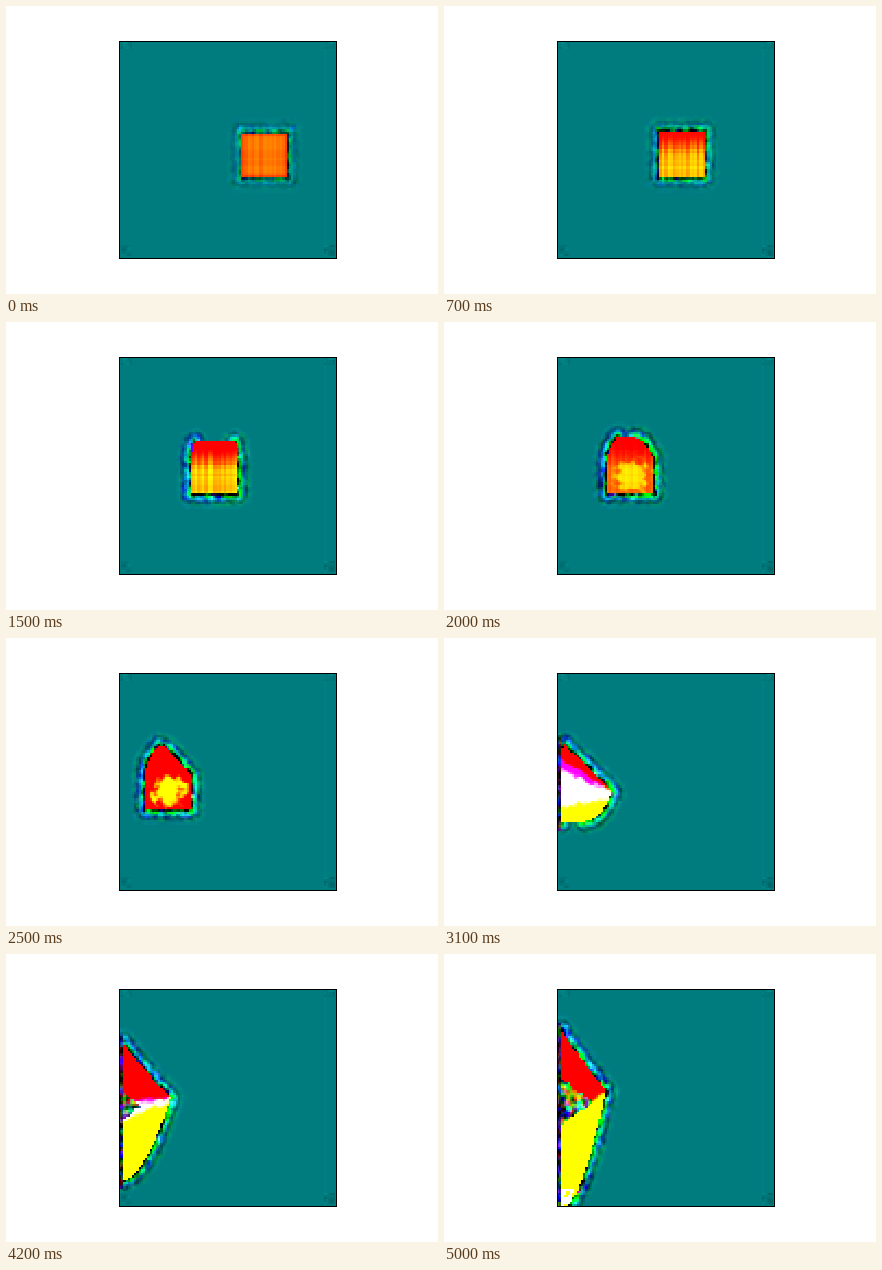
Animation of 432 by 288 pixels, one loop 5100 ms. Source, as a matplotlib script:

```python
import numpy as np
import matplotlib.pyplot as plt
from matplotlib.animation import FuncAnimation

FRAMES, STEP = 51, 100
N = 100
LEFT, TOP, SIZE = 112.7, 34.6, 217.4
CELL = SIZE / N
WALL = 117
HALF = 23
TEAL = (0.0, 0.49, 0.5)

axis = (np.arange(N) + 0.5) * CELL
X, Y = np.meshgrid(LEFT + axis, TOP + axis)
rng = np.random.default_rng(4)


def smooth(a, b, x):
    t = np.clip((x - a) / (b - a), 0, 1)
    return t * t * (3 - 2 * t)


def bell(x, centre, width):
    return np.exp(-((x - centre) / width) ** 2)


def soft_noise():
    """Complex noise, slightly blurred; turning its phase makes it shimmer."""
    z = rng.normal(size=(N, N)) + 1j * rng.normal(size=(N, N))
    for ax_id in (0, 1):
        z = 2 * z + np.roll(z, 1, ax_id) + np.roll(z, -1, ax_id)
    return z / z.real.std()


NOISE = np.array([soft_noise() for _ in range(4)])
COLS, ROWS = rng.uniform(0, 2 * np.pi, (2, N))


def backdrop():
    img = np.ones((N, N, 3)) * TEAL
    img[:, -6, 1:] += 0.012
    speck = 0.035 * NOISE[0].real - 0.02
    for rows in (slice(1, 4), slice(-6, -1)):
        for cols in (slice(1, 6), slice(-6, -1)):
            img[rows, cols, 1:] += speck[rows, cols, None]
    return img


BACK = backdrop()


class Blob:
    """A square that drifts left, then spreads into a wedge on the wall."""

    def __init__(self, k):
        self.cx = 258 - 2.6 * k - 0.05 * k * k
        self.top = 127 - 0.03 * min(k, 26) ** 2 - 1.6 * max(0, k - 31)
        self.bottom = 172 + 3.7 * max(0, k - 27.5)
        self.tip_y = np.interp(k, [25, 31, 50], [138, 154, 137])
        self.tip_x = max(self.cx + HALF, 168 - 0.35 * (k - 31))
        self.lean = 14 * smooth(10, 25, k)
        self.upper = 1.1 * smooth(13, 38, k)
        self.lower = 0.55 * smooth(25, 38, k)

    def sides(self, y):
        """Left and right edge at height y."""
        u = np.clip((y - self.top) / (self.tip_y - self.top), 0, 1)
        w = np.clip((self.bottom - y) / (self.bottom - self.tip_y), 0, 1)
        left = np.maximum(WALL, self.cx - HALF + self.lean * (1 - u) ** 2)
        reach = u ** self.upper * w ** self.lower
        return left, left + np.maximum(0, self.tip_x - left) * reach

    def distance(self):
        """Signed distance to the outline, negative inside."""
        ys = np.linspace(self.top, self.bottom, 70)
        left, right = self.sides(ys)
        t = np.linspace(0, 1, 25)
        px = [left, right] + [left[i] + (right[i] - left[i]) * t for i in (0, -1)]
        py = [ys, ys, 0 * t + self.top, 0 * t + self.bottom]
        best = np.full(X.shape, np.inf)
        for x, y in zip(np.concatenate(px), np.concatenate(py)):
            best = np.minimum(best, (X - x) ** 2 + (Y - y) ** 2)
        left, right = self.sides(Y)
        inside = (X > left) & (X < right) & (Y > self.top) & (Y < self.bottom)
        return np.sqrt(best) * np.where(inside, -1, 1)


def halo(k, blob, d, n, streak):
    """Ripples around the blob: bluer on its left, greener on its right."""
    mid, late = smooth(0, 17, k), smooth(23, 31, k)
    left, right = max(WALL, blob.cx - HALF), blob.tip_x
    nx = np.clip((2 * X - left - right) / (right - left + 8), -1, 1)
    ny = np.clip((2 * Y - blob.top - blob.bottom) / (blob.bottom - blob.top + 8), -1, 1)
    corner = smooth(0.75, 1, abs(nx)) * smooth(0.75, 1, abs(ny))

    fade = np.exp(-np.maximum(d, 0) / 5) * smooth(19, 9, d)
    wave = 2 * np.pi / 9
    size = 0.3 + 0.45 * mid
    rough = 0.1 + 0.3 * np.maximum(mid, corner)
    green = size * np.cos(wave * (d - 4) + 0.5 * n[0]) + 0.2 * nx * mid
    blue = size * np.cos(wave * (d - 5.5) + 0.5 * n[1]) - 0.25 * nx * mid * (1 - late)
    blue -= 0.3 * ny * late
    img = BACK.copy()
    img[..., 0] += 0.4 * mid * fade * np.maximum(0, n[3] - 0.8)
    img[..., 1] += fade * (green + rough * n[2] + 0.1 * streak)
    img[..., 2] += fade * (blue + rough * n[3] + 0.1 * streak)
    return img


def body(k, blob, d, n, streak):
    """Orange, then red over yellow, then bands that meet at the tip."""
    v = (Y - blob.top) / (blob.bottom - blob.top)
    flat = 0.45 - 0.22 * bell(d, 0, 3) + 0.1 * streak
    graded = (0.8 + 0.2 * streak) * smooth(0.15, 0.6, v + 0.08 * streak)
    patch = bell(np.hypot((X - blob.cx) / 17, (Y - 154) / 15), 0, 1)
    patch = smooth(0.25, 0.65, patch + 0.12 * n[0])
    green = flat + (graded - flat) * smooth(0, 9, k)
    green += (patch - green) * smooth(16, 24, k)

    late = smooth(25, 30, k)
    start = 132 + 1.8 * (k - 31)
    line = start + (blob.tip_y - start) * (X - WALL) / (blob.tip_x - WALL)
    thin = min(1, 1 - (k - 31) / 19)
    spread = np.clip((blob.tip_x - X) / (blob.tip_x - WALL), 0, 1)
    above = line - 11 * thin * spread
    below = line + thin * (6 + 32 * spread)
    green += (smooth(-2, 2, Y - line + n[0]) - green) * late
    blue = smooth(-2, 2, Y - above + n[1]) * smooth(-2, 2, below - Y + n[2])
    return np.stack([np.ones_like(X), green, blue * smooth(27, 30, k)], axis=-1)


def picture(k):
    blob = Blob(k)
    d = blob.distance()
    shift = round((blob.cx - 258) / CELL)
    n = (np.roll(NOISE, shift, axis=2) * np.exp(0.35j * k)).real
    streak = 0.65 * np.sin(np.roll(COLS, shift) + 0.2 * k)[None, :]
    streak = streak + 0.3 * np.sin(ROWS + 0.15 * k)[:, None]
    speckle = np.stack([0.3 + 0.4 * n[0], 0.5 + 0.35 * n[1], 0.25 + 0.35 * n[2]], axis=-1)

    inside = d < 0
    img = np.where(inside[..., None], body(k, blob, d, n, streak), halo(k, blob, d, n, streak))

    # Wedge opening at the wall
    age = k - 33
    if age > 0:
        reach = 1 + 1.8 * age
        half = (2 + 1.2 * age) * (1 - (X - WALL) / reach)
        wedge = inside & (abs(Y - 157 + 0.5 * age) < half + n[3])
        img[wedge] = speckle[wedge]

    # Dark speckled column along the wall
    if k > 27:
        wall = (X < WALL) & (Y > blob.top - 6) & (Y < blob.bottom + 8)
        img[wall] = speckle[wall] * (0.4, 0.5, 1.2) - (0, 0.1, 0)

    # White foam at the foot
    foam = inside & (X < 131) & (Y > 234) & (n[1] > 1 - 1.6 * smooth(42, 50, k))
    img[foam, 2] = 1
    return np.clip(img, 0, 1)


fig = plt.figure(figsize=(6, 4), dpi=72, facecolor="white")
ax = fig.add_axes([LEFT / 432, 36 / 288, SIZE / 432, SIZE / 288])
ax.set(xticks=[], yticks=[])
for spine in ax.spines.values():
    spine.set_linewidth(1)
image = ax.imshow(picture(0), interpolation="nearest", aspect="auto")


def draw(k):
    image.set_data(picture(k))
    return [image]


anim = FuncAnimation(fig, draw, frames=FRAMES, interval=STEP, repeat=True, repeat_delay=0)
plt.show()
```
